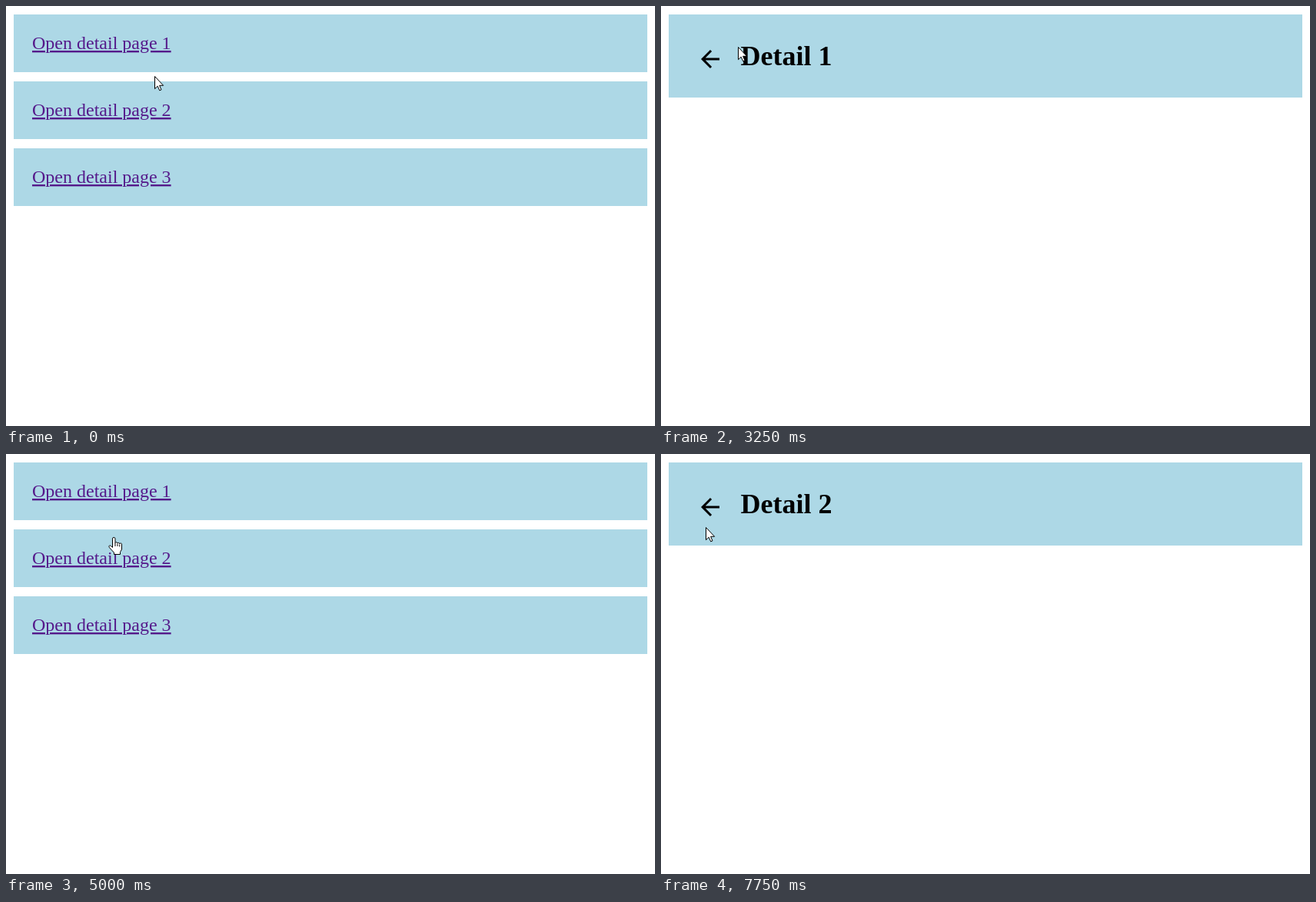
An HTML page that plays this animation: 844x546 px, repeating every 8 s.

```html
<!DOCTYPE html>
<html lang="en">
<head>
<meta charset="utf-8">
<title>Page slide</title>
<style>
  html, body { margin: 0; width: 100%; height: 100%; overflow: hidden; background: #fff; }
  svg { display: block; width: 100%; height: 100%; }
  .card { fill: #add8e6; }
  .link { font: 24px "Liberation Serif", serif; fill: #551a8b; text-decoration: underline; }
  .title { font: bold 36px "Liberation Serif", serif; }
  .status { font: 11.1px "Open Sans", sans-serif; fill: #606060; }
  .cursor { fill: #fff; stroke: #000; stroke-linejoin: round; }
</style>
</head>
<body>
<svg viewBox="0 0 844 546">
  <g id="list"></g>
  <g id="detail">
    <rect id="panel" x="10" y="11" width="824" height="108"/>
    <g id="back">
      <circle id="hover" cx="64" cy="65" r="30" opacity=".12"/>
      <path transform="translate(46 51) scale(1.5)" d="M20 11H7.83l5.59-5.59L12 4l-8 8 8 8 1.41-1.41L7.83 13H20z"/>
    </g>
    <text id="title" class="title" y="77"></text>
  </g>
  <g id="scrollbar">
    <path fill="#f1f1f1" d="M0 533H844V546H0z"/>
    <rect id="thumb" x="17" y="535" height="11" fill="#c1c1c1"/>
    <path fill="#505050" d="M836 537.5v8l4-4zM8 537.5v8l-4-4z"/>
  </g>
  <g id="status">
    <path fill="#f2f2f2" stroke="#d6d6d6" d="M-1 528.5H276.500q2.500 0 2.500 2.500V548H-1z"/>
    <text class="status" x="1" y="544">127.0.0.1:65033/.../index.html</text>
  </g>
  <g id="cursor" class="cursor">
    <path id="arrow" d="M.5.5V16.700L4.200 13.200 6.700 18.800 9 17.800 6.600 12.300H11.600z"/>
    <g id="hand" transform="translate(-6 0)">
      <path d="M5.500 13.500V2.200a1.750 1.750 0 0 1 3.500 0V7.500a1.600 1.600 0 0 1 3 .6 1.500 1.500 0 0 1 2.800.8 1.400 1.400 0 0 1 2.700 1V16L15.500 19.500V22.500H7.500V20.200L1.500 13.700C0 11.500 2 10 3.500 11.500z"/>
      <path fill="none" d="M9 7.500V12M12 8.500V12M14.800 9.500V12.500"/>
    </g>
  </g>
</svg>
<script>
const LOOP = 8000, STEP = 250, SLIDE = 500, WIDTH = 824;
const $ = id => document.getElementById(id);
const clamp = v => Math.max(0, Math.min(1, v));
const within = (t, a, b) => t >= a && t < b;
const show = (id, on) => $(id).setAttribute('visibility', on ? 'visible' : 'hidden');
const move = (id, x, y = 0) => $(id).setAttribute('transform', `translate(${x} ${y})`);

// time, x, y of the pointer tip
const path = [
  [0, 193, 91], [250, 195, 92], [500, 195, 92], [1000, 140, 55], [1250, 129, 50],
  [3000, 129, 50], [3250, 100, 53], [3500, 45, 53], [4500, 45, 53],
  [5000, 139, 108], [5250, 137, 137], [6750, 137, 137], [7750, 58, 95]
];

$('list').innerHTML = [1, 2, 3].map(n => {
  const y = 11 + 87 * (n - 1);
  return `<rect class="card" x="10" y="${y}" width="${WIDTH}" height="75"/>
    <text class="link" x="34" y="${y + 45}">Open detail page ${n}</text>`;
}).join('');

// CSS "ease": cubic-bezier(.25, .1, .25, 1)
function ease(x) {
  if (x <= 0 || x >= 1) return clamp(x);
  let lo = 0, hi = 1;
  for (let i = 0; i < 24; i++) {
    const s = (lo + hi) / 2;
    if (0.75 * s * (1 - s) + s ** 3 < x) lo = s; else hi = s;
  }
  return 0.3 * lo * (1 - lo) ** 2 + 3 * lo * lo * (1 - lo) + lo ** 3;
}

function pointer(t) {
  const i = path.findIndex(p => p[0] > t);
  if (i < 0) return path[path.length - 1].slice(1);
  const [t0, x0, y0] = path[i - 1], [t1, x1, y1] = path[i];
  const k = (t - t0) / (t1 - t0);
  return [x0 + (x1 - x0) * k, y0 + (y1 - y0) * k];
}

function statusOpacity(t) {
  const fade = within(t, 1000, 2500) ? 2300 : within(t, 5250, 6250) ? 6050 : 0;
  return clamp((fade - t) / 250);
}

function draw(t) {
  const slide = start => ease((t - start) / SLIDE);
  const p = slide(1814) - slide(3995.5) + slide(5572);
  const offset = WIDTH * (1 - p);
  move('list', -WIDTH * p);
  move('detail', offset);
  show('list', p < 1);
  show('detail', p > 0);

  const page = within(t, 3250, 5250) ? 1 : t >= 6750 ? 2 : 0;
  $('panel').setAttribute('fill', page ? '#add8e6' : '#d3d3d3');
  $('title').textContent = page ? `Detail ${page}` : 'Detail loading...';
  $('title').setAttribute('x', page ? 103.5 : 34);
  $('back').style.display = page ? '' : 'none';
  $('hover').style.display = within(t, 3500, 4250) ? '' : 'none';

  const content = 834 + offset;
  show('scrollbar', p > 0 && content > 844);
  $('thumb').setAttribute('width', 814 * 844 / content);
  $('status').setAttribute('opacity', statusOpacity(t));

  const hand = within(t, 750, 1750) || within(t, 4750, 5500);
  move('cursor', ...pointer(t).map(Math.round));
  show('hand', hand);
  show('arrow', !hand);
}

const begin = performance.now();
function tick() {
  const t = (performance.now() - begin) % LOOP;
  draw(Math.floor(t / STEP) * STEP);
  requestAnimationFrame(tick);
}
tick();
</script>
</body>
</html>
```
